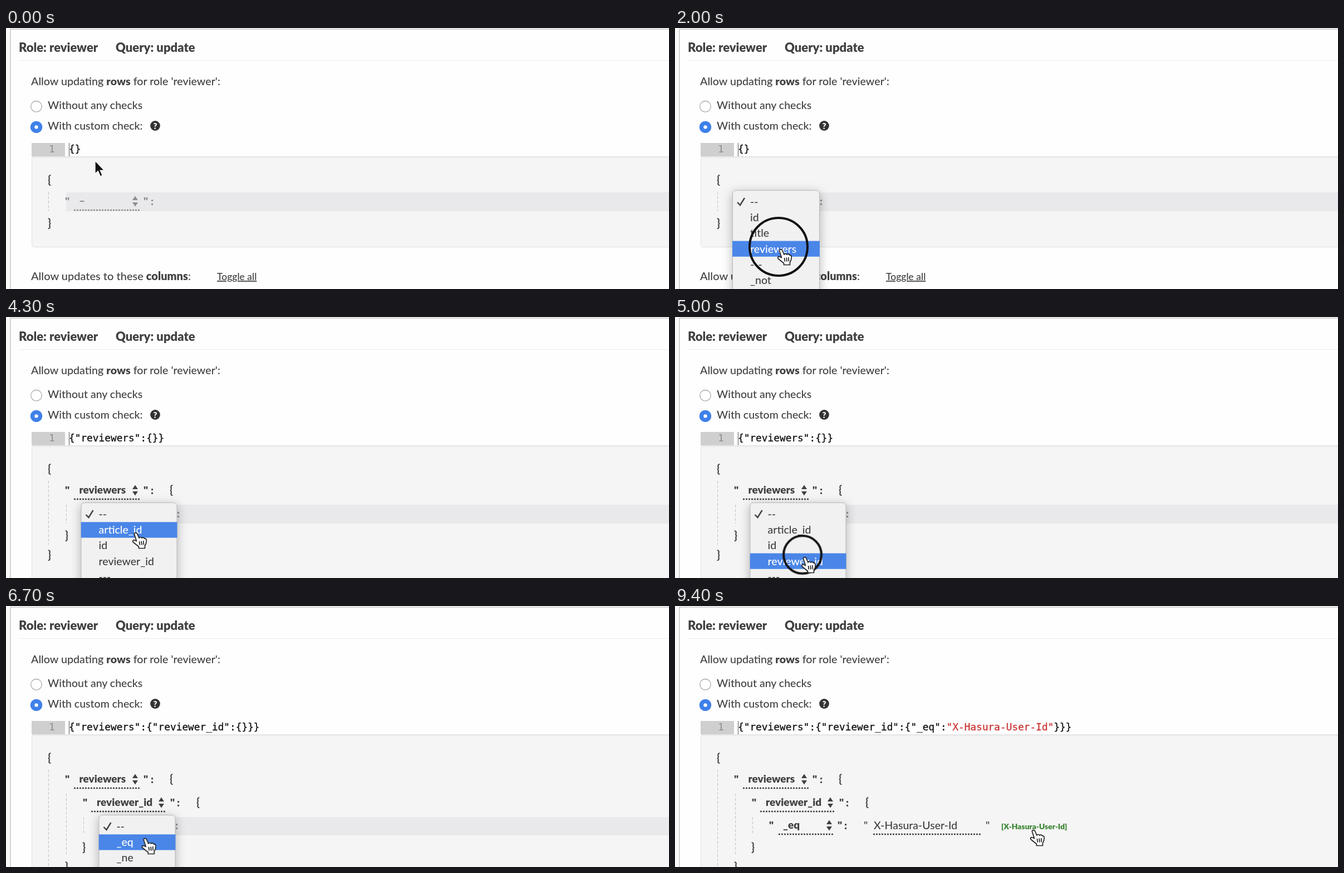
An HTML page for the animation above (9.7 s loop, 1191 px wide and 470 px high).

```html
<!DOCTYPE html>
<html lang="en">
<head>
<meta charset="utf-8">
<title>Permission builder</title>
<style>
html, body { margin: 0; width: 100%; height: 100%; overflow: hidden; background: #fefefe; }
svg { display: block; width: 100vw; height: 100vh; color: #404040; }
text { font: 500 19.5px Lato, sans-serif; fill: currentColor; white-space: pre; }
.b { font-weight: 900; }
.brace { font-size: 20px; font-weight: 700; }
.title { font-size: 22px; font-weight: 900; }
.code text, .num { font: 17.8px "DejaVu Sans Mono", monospace; fill: #111; }
.code text { stroke: #111; stroke-width: .3; }
.code .str { fill: #cb3434; stroke: #cb3434; }
.num { fill: #8c8c8c; }
.sel { font-size: 19px; font-weight: 900; }
.hint { font-size: 13.8px; font-weight: 900; fill: #37832f; }
.dim { color: #8e8e90; }
.band { fill: #e9e9eb; }
.box { fill: #f5f5f5; stroke: #e0e0e0; }
.guide { fill: none; stroke: #c2c2c2; stroke-dasharray: 5 3; }
.dots { fill: none; stroke: currentColor; stroke-width: 2.3; stroke-dasharray: 3 2; }

/* Menus */
.menu { filter: drop-shadow(0 4px 9px rgba(0,0,0,.28)); }
.pane { fill: #f1f1f1; stroke: #b9b9b9; }
.blue { fill: #4a86e8; }
.menu text { font: 21px Roboto, sans-serif; }
.menu .off { fill: #b4b4b4; }
.lit { color: #fff; }
.tick { fill: none; stroke: currentColor; stroke-width: 2.4; }

/* Every part shares one 9.7 s clock */
.s0, .s1, .s2, .s3, .s4, .r1, .r2, .r3, .m1, .m2, .m3, .h1, .h2, .h3, .arrow, .hand {
  animation: 9.7s step-end infinite;
}
.s0 { animation-name: s0; }
.s1 { animation-name: s1; }
.s2 { animation-name: s2; }
.s3 { animation-name: s3; }
.s4 { animation-name: s4; }
.r1 { animation-name: r1; }
.r2 { animation-name: r2; }
.r3 { animation-name: r3; }
.m1 { animation-name: m1; }
.m2 { animation-name: m2; }
.m3 { animation-name: m3; }
.h1 { animation-name: h1; }
.h2 { animation-name: h2; }
.h3 { animation-name: h3; }
.arrow { animation-name: arrow; }
.hand { animation-name: hand; }
.pointer { animation: move 9.7s ease-in-out infinite; }
.ring {
  fill: none; stroke: #111; stroke-width: 4; vector-effect: non-scaling-stroke;
  transform-box: fill-box; transform-origin: center;
  animation: click 9.7s linear infinite;
  animation-delay: calc(var(--at) - 9.7s);
}

/* Query stages */
@keyframes s0 { 0% { visibility: visible } 23.71%, 100% { visibility: hidden } }
@keyframes s1 { 0% { visibility: hidden } 23.71% { visibility: visible } 53.61%, 100% { visibility: hidden } }
@keyframes s2 { 0% { visibility: hidden } 53.61% { visibility: visible } 74.23%, 100% { visibility: hidden } }
@keyframes s3 { 0% { visibility: hidden } 74.23% { visibility: visible } 88.66%, 100% { visibility: hidden } }
@keyframes s4 { 0% { visibility: hidden } 88.66%, 100% { visibility: visible } }

/* Filled rows */
@keyframes r1 { 0% { visibility: hidden } 23.71%, 100% { visibility: visible } }
@keyframes r2 { 0% { visibility: hidden } 53.61%, 100% { visibility: visible } }
@keyframes r3 { 0% { visibility: hidden } 74.23%, 100% { visibility: visible } }

/* Open menus and their highlighted line */
@keyframes m1 { 0% { visibility: hidden } 12.37% { visibility: visible } 23.71%, 100% { visibility: hidden } }
@keyframes m2 { 0% { visibility: hidden } 38.14% { visibility: visible } 53.61%, 100% { visibility: hidden } }
@keyframes m3 { 0% { visibility: hidden } 65.98% { visibility: visible } 74.23%, 100% { visibility: hidden } }
@keyframes h1 {
  0% { transform: translateY(0) }
  15.05% { transform: translateY(28.2px) }
  16.13% { transform: translateY(56.4px) }
  17.22%, 100% { transform: translateY(84.6px) }
}
@keyframes h2 {
  0% { transform: translateY(0) }
  41.1% { transform: translateY(28.2px) }
  45.5% { transform: translateY(56.4px) }
  47.4%, 100% { transform: translateY(84.6px) }
}
@keyframes h3 { 0% { transform: translateY(0) } 68.6%, 100% { transform: translateY(28.2px) } }

/* Pointer */
@keyframes move {
  0%, 1.03% { transform: translate(160px, 239px) }
  5.15%, 13.4% { transform: translate(186px, 304px) }
  18.56%, 24.7% { transform: translate(184px, 398px) }
  32.99%, 34.1% { transform: translate(261px, 372px) }
  36.08%, 38.14% { transform: translate(235px, 352px) }
  44.33%, 44.4% { transform: translate(227px, 388px) }
  48.45%, 53.61% { transform: translate(227px, 432px) }
  56.7%, 58.86% { transform: translate(225px, 430px) }
  63.92%, 66.49% { transform: translate(232px, 392px) }
  70.1%, 79.38% { transform: translate(246px, 423px) }
  86.6%, 100% { transform: translate(638px, 403px) }
}
@keyframes arrow {
  0% { visibility: visible }
  4.1% { visibility: hidden }
  24.7% { visibility: visible }
  30.93% { visibility: hidden }
  54.6% { visibility: visible }
  61.86% { visibility: hidden }
  80.4% { visibility: visible }
  85.57%, 100% { visibility: hidden }
}
@keyframes hand {
  0% { visibility: hidden }
  4.1% { visibility: visible }
  24.7% { visibility: hidden }
  30.93% { visibility: visible }
  54.6% { visibility: hidden }
  61.86% { visibility: visible }
  80.4% { visibility: hidden }
  85.57%, 100% { visibility: visible }
}
@keyframes click {
  0% { transform: scale(.3); opacity: 1 }
  2.06%, 3.09% { transform: scale(1); opacity: 1 }
  3.1%, 100% { transform: scale(1); opacity: 0 }
}
</style>
</head>
<body>
<svg viewBox="0 0 1191 470">
  <defs>
    <path id="spin" d="M-5 -2 L0 -9.5 L5 -2Z M-5 2 L0 9.5 L5 2Z" fill="currentColor"/>
    <g id="field1">
      <text class="b" x="106" y="319">"</text>
      <path class="dots" d="M122 328H241"/>
      <use href="#spin" x="232" y="312"/>
      <text class="b" x="247" y="319">"</text><text class="b" x="260" y="319">:</text>
    </g>
    <g id="field2">
      <text class="b" x="138" y="361">"</text>
      <path class="dots" d="M153 370H288"/>
      <use href="#spin" x="279" y="354"/>
      <text class="b" x="295" y="361">"</text><text class="b" x="307" y="361">:</text>
    </g>
    <g id="field3">
      <text class="b" x="169" y="402">"</text>
      <path class="dots" d="M186 411H285"/>
      <use href="#spin" x="277" y="395"/>
      <text class="b" x="292" y="402">"</text><text class="b" x="304" y="402">:</text>
    </g>
    <path id="tick" class="tick" d="M9 22L14 27L22 14"/>
    <g id="list1">
      <use href="#tick"/>
      <text x="32" y="28">--</text>
      <text x="32" y="56">id</text>
      <text x="32" y="84">title</text>
      <text x="32" y="112.5">reviewers</text>
      <text class="off" x="32" y="140.5">---</text>
      <text x="32" y="169">_not</text>
    </g>
    <g id="list2">
      <use href="#tick"/>
      <text x="32" y="28">--</text>
      <text x="32" y="56">article_id</text>
      <text x="32" y="84">id</text>
      <text x="32" y="112.5">reviewer_id</text>
      <text class="off" x="32" y="140.5">---</text>
    </g>
    <g id="list3">
      <use href="#tick"/>
      <text x="32" y="28">--</text>
      <text x="32" y="56">_eq</text>
      <text x="32" y="84">_ne</text>
      <text x="32" y="112.5">_in</text>
    </g>
    <clipPath id="line1"><rect class="h1" y="7" width="200" height="28.2"/></clipPath>
    <clipPath id="line2"><rect class="h2" y="7" width="200" height="28.2"/></clipPath>
    <clipPath id="line3"><rect class="h3" y="7" width="200" height="28.2"/></clipPath>
    <linearGradient id="shade" x2="0" y2="1">
      <stop stop-color="#e2e2e2"/><stop offset="1" stop-color="#f5f5f5"/>
    </linearGradient>
  </defs>

  <!-- Page -->
  <rect width="1191" height="470" fill="#fefefe"/>
  <rect width="7" height="470" fill="#fafafa"/>
  <path d="M1191 2H8V470" fill="none" stroke="#c6c6c6" stroke-width="1.5"/>
  <path d="M24 58.5H1191" stroke="#ececec"/>
  <text class="title" x="23" y="43">Role: reviewer</text>
  <text class="title" x="197" y="43">Query: update</text>
  <text x="45" y="102.5" style="font-size:19.7px">Allow updating <tspan class="b">rows</tspan> for role 'reviewer':</text>
  <circle cx="54.5" cy="141.3" r="9.8" fill="#fff" stroke="#a9a9a9" stroke-width="1.3"/>
  <text x="75" y="146">Without any checks</text>
  <circle cx="54.5" cy="178.4" r="10.7" fill="#3f80e9"/>
  <circle cx="54.5" cy="178.4" r="3.2" fill="#fff"/>
  <text x="75" y="183">With custom check:</text>
  <circle cx="268" cy="176" r="8.9" fill="#333"/>
  <text x="268" y="181.5" text-anchor="middle" style="font-size:15px;font-weight:900;fill:#fff">?</text>

  <!-- Editor -->
  <rect x="46" y="207" width="60" height="24" fill="#cfcfd0"/>
  <text class="num" x="77" y="224">1</text>
  <path d="M113.5 207V231" stroke="#8a8a8a" stroke-width="1.5"/>
  <g class="code">
    <text class="s0" x="113" y="224">{}</text>
    <text class="s1" x="113" y="224">{"reviewers":{}}</text>
    <text class="s2" x="113" y="224">{"reviewers":{"reviewer_id":{}}}</text>
    <text class="s3" x="113" y="224">{"reviewers":{"reviewer_id":{"_eq":<tspan class="str">""</tspan>}}}</text>
    <text class="s4" x="113" y="224">{"reviewers":{"reviewer_id":{"_eq":<tspan class="str">"X-Hasura-User-Id"</tspan>}}}</text>
  </g>

  <!-- Builder -->
  <g class="s0">
    <rect class="box" x="46.5" y="231.5" width="1160" height="163" rx="4"/>
    <text x="45" y="454" style="font-size:20px">Allow updates to these <tspan class="b">columns</tspan>:</text>
    <text x="379" y="454" style="font-size:17.5px;text-decoration:underline">Toggle all</text>
  </g>
  <rect class="box r1" x="46.5" y="231.5" width="1160" height="260" rx="4"/>
  <rect x="47" y="231" width="1144" height="4" fill="url(#shade)"/>
  <text class="brace" x="75" y="280">{</text>

  <g class="s0">
    <rect class="band" x="108" y="296" width="1083" height="34"/>
    <path class="guide" d="M76.5 295V330"/>
    <g class="dim">
      <use href="#field1"/>
      <text class="sel" x="131" y="318">–</text>
    </g>
    <text class="brace" x="75" y="358">}</text>
  </g>

  <g class="r1">
    <use href="#field1"/>
    <text class="sel" x="131.5" y="318">reviewers</text>
    <text class="brace" x="294" y="318">{</text>
  </g>
  <g class="s1">
    <rect class="band" x="139" y="338" width="1052" height="34"/>
    <path class="guide" d="M76.5 295V410M108.5 338V372"/>
    <g class="dim">
      <use href="#field2"/>
      <text class="sel" x="162" y="360">–</text>
    </g>
    <text class="brace" x="106" y="400">}</text>
    <text class="brace" x="75" y="435">}</text>
  </g>

  <g class="r2">
    <path class="guide" d="M76.5 295V470M108.5 338V450M139.5 380V412"/>
    <use href="#field2"/>
    <text class="sel" x="163" y="360">reviewer_id</text>
    <text class="brace" x="342" y="360">{</text>
    <text class="brace" x="137" y="441">}</text>
    <text class="brace" x="106" y="476">}</text>
  </g>
  <g class="s2">
    <rect class="band" x="170" y="380" width="1021" height="33"/>
    <g class="dim">
      <use href="#field3"/>
      <text class="sel" x="194" y="401">–</text>
    </g>
  </g>

  <g class="r3">
    <use href="#field3"/>
    <text class="sel" x="194" y="401">_eq</text>
    <text x="339" y="402">"</text>
    <path class="dots" d="M356 411H550"/>
    <text x="558" y="402">"</text>
    <text class="hint" x="586" y="401.5">[X-Hasura-User-Id]</text>
  </g>
  <text class="s4" x="357" y="402">X-Hasura-User-Id</text>

  <!-- Menus -->
  <g transform="translate(103 292)"><g class="menu m1">
    <rect class="pane" x=".5" y=".5" width="156" height="220" rx="6"/>
    <use href="#list1"/>
    <g class="lit" clip-path="url(#line1)">
      <rect class="blue" width="157" height="200"/><use href="#list1"/>
    </g>
  </g></g>
  <g transform="translate(134.5 334)"><g class="menu m2">
    <rect class="pane" x=".5" y=".5" width="172" height="220" rx="6"/>
    <use href="#list2"/>
    <g class="lit" clip-path="url(#line2)">
      <rect class="blue" width="173" height="200"/><use href="#list2"/>
    </g>
  </g></g>
  <g transform="translate(166.5 376)"><g class="menu m3">
    <rect class="pane" x=".5" y=".5" width="137" height="220" rx="6"/>
    <use href="#list3"/>
    <g class="lit" clip-path="url(#line3)">
      <rect class="blue" width="138" height="200"/><use href="#list3"/>
    </g>
  </g></g>

  <!-- Clicks -->
  <circle class="ring" cx="188" cy="302" r="52" style="--at:1s"/>
  <circle class="ring" cx="186" cy="394" r="52" style="--at:1.8s"/>
  <circle class="ring" cx="237" cy="348" r="52" style="--at:3.5s"/>
  <circle class="ring" cx="229" cy="428" r="52" style="--at:4.9s"/>
  <circle class="ring" cx="234" cy="388" r="52" style="--at:6.2s"/>
  <circle class="ring" cx="248" cy="419" r="52" style="--at:6.9s"/>
  <circle class="ring" cx="642" cy="397" r="52" style="--at:8.4s"/>

  <g class="pointer">
    <path class="arrow" d="M0 0V23.5L5.3 18.6L9.3 28L13.2 26.3L9.3 17.3H16.5Z" fill="#111" stroke="#fff" stroke-width="1.3"/>
    <g class="hand" stroke="#222" stroke-width="1.7" stroke-linejoin="round" stroke-linecap="round">
      <path fill="#fff" d="M3.5 3C3 .5 7 -.5 8.5 2L12 10C13 8 16 8 17 10C18.5 8.5 21 9 21.8 11C23.8 10.5 25.3 12 25.3 14.5L24.5 20L22.5 23.5V28.5H11.5V25.5L7 22L1.5 17.5C-.5 15.5 1.5 12.5 4.5 14L7.5 15.5Z"/>
      <path fill="none" d="M12.5 16.5L13.5 22M16.3 16L17 22M20 15.5L20.3 21.5"/>
    </g>
  </g>
</svg>
</body>
</html>
```
